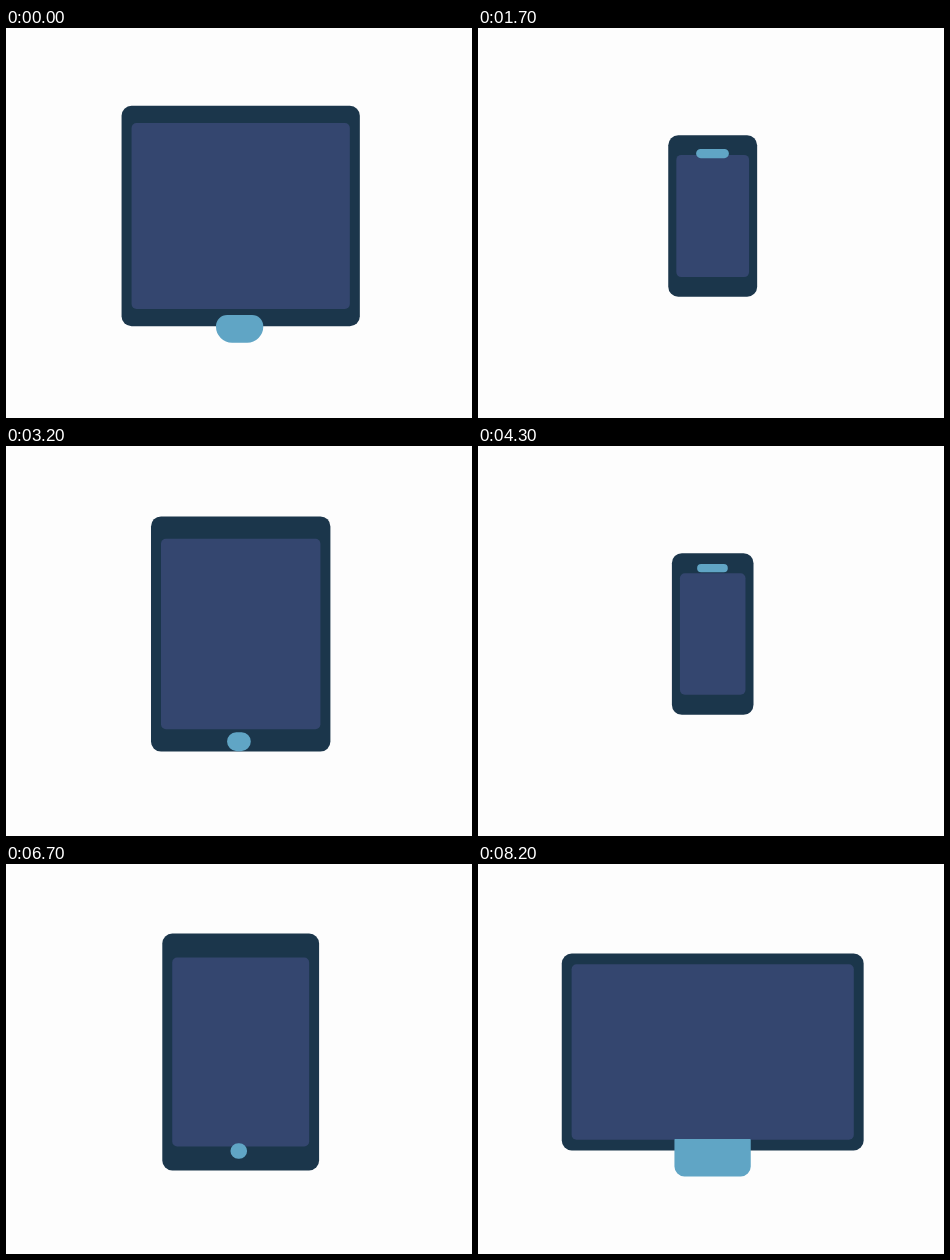
Recreate the animation shown at these times as an HTML page. Size 466 by 390 pixels, loop 8300 ms.

```html
<!DOCTYPE html>
<html lang="en">
<head>
<meta charset="utf-8">
<title>Monitor, tablet, phone</title>
<style>
  html, body { margin: 0; width: 100%; height: 100%; overflow: hidden; background: #fdfdfd; }
  svg { display: block; width: 100%; height: 100%; }
</style>
</head>
<body>
<svg viewBox="0 0 466 390">
  <rect id="body" rx="10" fill="#1b364b"/>
  <rect id="screen" rx="5" fill="#34466f"/>
  <path id="part" fill="#60a5c5"/>
</svg>
<script>
const LOOP = 8300, MORPH = 800;
const CX = 234.7, CY = 188;

// body: w, h; screen: w, h; part: cx, cy, w, h, top radius, bottom radius
const monitor = [320, 200, 300, 180, 234.6, 308, 80, 40, 0, 10];
const tablet = [160, 240, 140, 192, 232.7, 294, 16, 16, 22, 22];
const phone = [80, 160, 64, 120, 234.5, 118.6, 31, 8, 10, 10];
const devices = [monitor, tablet, phone];

// start of each morph, in ms
const starts = [-404, 577, 1592, 2595, 3582, 4592, 5592, 6588, 7555];

const body = document.getElementById('body');
const screenBox = document.getElementById('screen');
const part = document.getElementById('part');

// cubic-bezier(.42, 0, .58, 1)
function easeInOut(x) {
  if (x <= 0) return 0;
  if (x >= 1) return 1;
  let lo = 0, hi = 1, s = 0.5;
  for (let i = 0; i < 24; i++) {
    s = (lo + hi) / 2;
    const u = 1 - s;
    if (3 * u * u * s * 0.42 + 3 * u * s * s * 0.58 + s * s * s < x) lo = s;
    else hi = s;
  }
  return s * s * (3 - 2 * s);
}

function placeRect(el, w, h) {
  el.setAttribute('x', CX - w / 2);
  el.setAttribute('y', CY - h / 2);
  el.setAttribute('width', w);
  el.setAttribute('height', h);
}

function roundedPath(cx, cy, w, h, top, bottom) {
  const fit = Math.min(1, h / (top + bottom), w / (2 * Math.max(top, bottom)));
  const a = top * fit, b = bottom * fit;
  const x = cx - w / 2, y = cy - h / 2;
  const corner = (r, dx, dy) => `a${r} ${r} 0 0 1 ${dx} ${dy}`;
  return `M${x + a} ${y}H${x + w - a}${corner(a, a, a)}V${y + h - b}${corner(b, -b, b)}` +
    `H${x + b}${corner(b, -b, -b)}V${y + a}${corner(a, a, -a)}Z`;
}

function draw(t) {
  let i = starts.length - 1;
  while (i > 0 && t < starts[i]) i--;
  const p = easeInOut((t - starts[i]) / MORPH);
  const from = devices[i % 3], to = devices[(i + 1) % 3];
  const v = from.map((n, k) => n + (to[k] - n) * p);
  placeRect(body, v[0], v[1]);
  placeRect(screenBox, v[2], v[3]);
  part.setAttribute('d', roundedPath(...v.slice(4)));
}

const begin = performance.now();
function tick() {
  draw((performance.now() - begin) % LOOP);
  requestAnimationFrame(tick);
}
tick();
</script>
</body>
</html>
```
